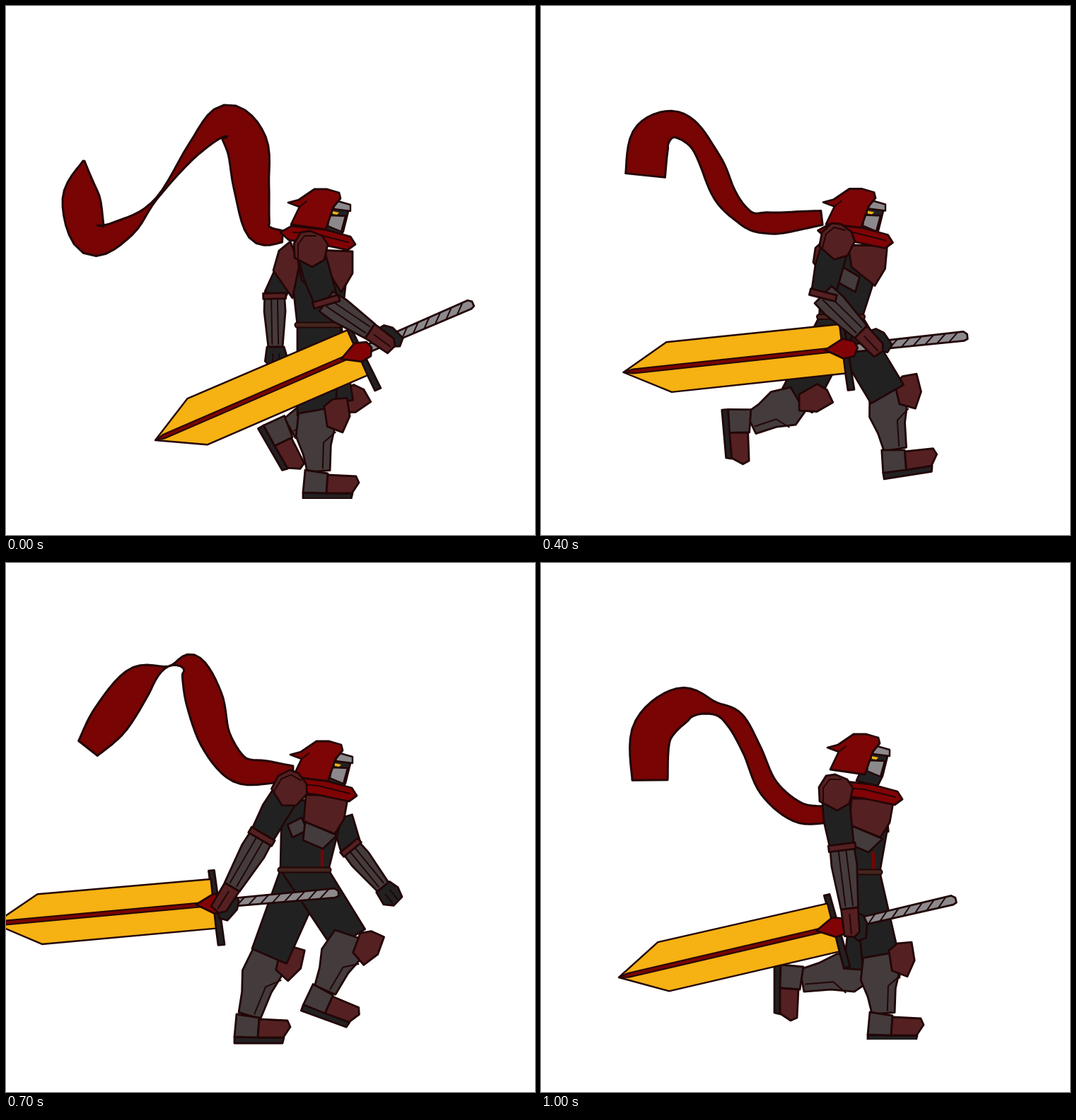
Write an HTML page with a canvas that moves like this. It is 748 px wide and 748 px high and loops after 1100 ms.

```html
<!DOCTYPE html>
<html lang="en">
<head>
<meta charset="utf-8">
<title>Knight walk</title>
<style>
html, body { margin: 0; width: 100%; height: 100%; overflow: hidden; background: #fff; }
canvas { display: block; width: 748px; height: 748px; }
</style>
</head>
<body>
<canvas id="stage" width="748" height="748"></canvas>
<script>
const ctx = document.getElementById('stage').getContext('2d');
const STEP = 100, COUNT = 11, SAMPLES = 60;
const INK = '#220607', CLOTH = '#780404', HOOD = '#7d0506', PLATE = '#552021',
  STEEL = '#443b3c', BLACK = '#222122', GREY = '#8c898d', GOLD = '#f6b112';

const rad = deg => deg * Math.PI / 180;
const clamp = (v, lo, hi) => Math.max(lo, Math.min(hi, v));
const shift = (p, x, y) => p.map((v, i) => v + (i % 2 ? y : x));

function mix(a, b, k) {
  if (typeof a === 'number') return a + (b - a) * k;
  if (Array.isArray(a)) return a.map((v, i) => mix(v, b[i], k));
  return Object.fromEntries(Object.keys(a).map(key => [key, mix(a[key], b[key], k)]));
}

// Smooth curve through the keys, evenly sampled
function sample(keys) {
  const last = keys.length - 1, key = i => keys[clamp(i, 0, last)];
  return Array.from({ length: SAMPLES + 1 }, (_, n) => {
    const u = n / SAMPLES * last, i = Math.min(Math.floor(u), last - 1), f = u - i;
    const a = key(i - 1), b = key(i), c = key(i + 1), d = key(i + 2);
    return b.map((v, j) => v + f / 2 * (c[j] - a[j]
      + f * (2 * a[j] - 5 * v + 4 * c[j] - d[j] + f * (3 * v - a[j] - 3 * c[j] + d[j]))));
  });
}

// Scarf centre lines from neck to tail: x, y, half width
const ess = sample([[391,326,8], [358,318,17], [347,255,25], [340,195,29], [310,163,23], [266,202,10],
  [213,272,1], [172,312,13], [122,330,23], [106,270,26], [110,219,1]]);
const arch = sample([[398,309,9], [362,309,16], [320,304,19], [288,262,22], [272,205,26], [253,157,16],
  [222,159,0], [180,180,22], [139,235,27], [108,275,17]]);
const dip = sample([[403,288,9], [369,298,13], [337,330,16], [296,362,10], [257,340,18], [241,275,21],
  [225,210,17], [197,174,13], [175,180,27], [163,216,31]]);
const hook = sample([[391,311,11], [343,309,14], [300,274,14], [276,220,13], [252,178,13], [222,161,9],
  [178,156,24], [135,195,28], [132,263,25]]);
const moved = (scarf, dx, dy) => scarf.map(([x, y, w]) => [x + dx, y + dy, w]);

// torso: offset, turn towards the viewer; waist: centre, half width
// legs: knee, ankle, boot angle; hand: far wrist; sword: tip, angle
const poses = {
  0: { head: [0,0], torso: [0,0,0], waist: [443,451,31], floor: 697, scarf: ess,
    legP: [436,580,442,656,0], legQ: [462,562,403,596,60], hand: [381,482], sword: [211,614,-23.4] },
  1: { head: [-1,0], torso: [6,3,0], waist: [442,452,28], floor: 686, scarf: arch,
    legP: [392,564,363,645,14], legQ: [498,533,475,606,22], hand: [352,475], sword: [221,600,-23.3] },
  3: { head: [1,0], torso: [-2,-3,0], waist: [418,438,30], floor: 700, scarf: dip,
    legP: [332,550,285,595,45], legQ: [513,543,543,614,-18], hand: [363,455], sword: [190,536,-13.3] },
  5: { head: [-1,-1], torso: [7,6,1], waist: [430,441,31], floor: 678, scarf: hook,
    legP: [384,572,312,584,125], legQ: [462,557,458,636,0], hand: [473,475], sword: [43,500,1.05] },
  7: { head: [3,-7], torso: [0,0,1], waist: [422,434,34], floor: 681, scarf: moved(arch, 8, -13),
    legP: [483,533,452,602,20], legQ: [370,555,345,638,0], hand: [533,458], sword: [-17,510,-5.2] },
  9: { head: [4,-14], torso: [5,-6,1], waist: [427,434,38], floor: 647, scarf: moved(dip, -8, -18),
    legP: [503,510,542,583,-15], legQ: [335,525,276,586,28], hand: [514,444], sword: [5,534,-10.8] },
  10: { head: [6,-17], torso: [15,5,1], waist: [461,437,18], floor: 674, scarf: moved(hook, 22, 44),
    legP: [478,562,484,635,0], legQ: [452,575,371,590,90], hand: [455,440], sword: [110,586,-13.1] }
};

// Each armour part seen from behind and from the front
const armour = [
  [PLATE, [402,333, 386,346, 378,374, 405,413, 415,365], [395,325, 385,335, 387,348, 392,352, 402,345]],
  [STEEL, [416,370, 425,378, 430,390, 420,385], [398,370, 418,360, 426,378, 405,388]],
  [STEEL, [413,362, 428,378, 436,402, 418,388], [423,366, 468,385, 448,404, 420,392]],
  [PLATE, [440,345, 490,347, 490,378, 474,405, 452,370], [424,328, 484,328, 478,362, 465,383, 421,365]]
];

function paint(fill, width) {
  ctx.fillStyle = fill;
  ctx.fill();
  ctx.lineWidth = width;
  ctx.strokeStyle = INK;
  ctx.stroke();
}

function trace(p) {
  ctx.beginPath();
  for (let i = 0; i < p.length; i += 2) ctx.lineTo(p[i], p[i + 1]);
}

function poly(fill, p, width = 2.8) {
  trace(p);
  ctx.closePath();
  paint(fill, width);
}

function line(p, width = 2, color = INK) {
  trace(p);
  ctx.lineWidth = width;
  ctx.strokeStyle = color;
  ctx.stroke();
}

function at(x, y, angle, draw) {
  ctx.save();
  ctx.translate(x, y);
  ctx.rotate(angle);
  draw();
  ctx.restore();
}

// Local x runs from the first joint to the second
function bone([x0, y0], [x1, y1], draw) {
  const dx = x1 - x0, dy = y1 - y0;
  at(x0, y0, Math.atan2(dy, dx), () => draw(Math.hypot(dx, dy)));
}

// Elbow of a two-bone arm, always bent backwards
function elbow([ax, ay], [bx, by], upper, lower) {
  const reach = clamp(Math.hypot(bx - ax, by - ay), Math.abs(upper - lower) + 1, upper + lower);
  const bend = Math.acos((upper ** 2 + reach ** 2 - lower ** 2) / (2 * upper * reach));
  const angle = Math.atan2(by - ay, bx - ax) + bend;
  return [ax + upper * Math.cos(angle), ay + upper * Math.sin(angle)];
}

function onSword([x, y, angle], along, side) {
  const c = Math.cos(rad(angle)), s = Math.sin(rad(angle));
  return [x + along * c - side * s, y + along * s + side * c];
}

function drawScarf(scarf) {
  const left = [], right = [];
  scarf.forEach(([x, y, w], i) => {
    const a = scarf[Math.max(i - 1, 0)], b = scarf[Math.min(i + 1, SAMPLES)];
    const dx = b[0] - a[0], dy = b[1] - a[1], k = w / Math.hypot(dx, dy);
    left.push([x + dy * k, y - dx * k]);
    right.unshift([x - dy * k, y + dx * k]);
  });
  poly(CLOTH, [...left, ...right].flat(), 3);
}

function drawBoot(x, y, angle) {
  at(x, y, rad(angle), () => {
    poly(BLACK, [-22,32, 48,33, 46,41, -22,41]);
    poly(STEEL, [-19,0, 13,5, 11,33, -22,32]);
    poly(PLATE, [13,7, 53,9, 57,18, 47,33, 11,33]);
  });
}

function drawLeg([kx, ky, ax, ay, angle]) {
  bone([kx, ky], [ax, ay], len => {
    const k = len / 80, lean = (kx - ax) / len;
    const fit = p => p.map((v, i) => i % 2 ? v : v * k);
    poly(STEEL, fit([-6,22, -10,-18, 14,-29, 45,-20, 82,-16, 82,16, 55,20, 28,28]));
    line(fit([26,-28, 40,-10, 78,-6]));
    // a folded knee pushes its cap over the end of the thigh
    const fold = clamp((lean - .35) / .6, 0, 1);
    poly(PLATE, shift([-13,-15, -22,-28, -22,-48, 4,-50, 26,-38, 16,-17], -30 * fold, 27 * fold));
  });
  drawBoot(ax, ay, angle);
}

function drawThigh([wx, wy, half], [kx, ky]) {
  const dx = kx - wx, dy = ky - wy, d = Math.hypot(dx, dy), nx = dy / d, ny = -dx / d;
  poly(BLACK, [wx - half, wy, wx + half, wy,
    kx + nx * 29, ky + ny * 29, kx - nx * 24, ky - ny * 24]);
}

function forearm(len, w) {
  poly(STEEL, [0,-w, len * .3,-w - 1, len,-w * .72, len,w * .72, len * .3,w + 1, 0,w]);
  for (const side of [-.3, .33]) line([5, w * side, len - 4, w * side]);
}

function drawFarArm(shoulder, wrist) {
  const mid = elbow(shoulder, wrist, 44, 72);
  bone(shoulder, mid, len => poly(BLACK, [0,-15, len,-15, len,15, 0,15]));
  bone(mid, wrist, len => {
    forearm(len, 14);
    poly(PLATE, [-4,-16, 4,-16, 4,16, -4,16]);
    ctx.translate(len, 0);
    poly(BLACK, [0,-12, 14,-16, 28,-12, 30,5, 20,15, 0,12]);
    for (const y of [-5, 4]) line([10, y, 26, y]);
  });
}

function drawNearArm(shoulder, wrist) {
  const mid = elbow(shoulder, wrist, 78, 75);
  bone(shoulder, mid, len => poly(BLACK, [0,-19, len,-17, len,17, len / 2,21, 0,19]));
  bone(mid, wrist, len => {
    forearm(len, 17);
    ctx.translate(len, 0);
    poly(BLACK, [6,-6, 12,-18, 24,-22, 44,-18, 47,-6, 36,2]);
    poly(PLATE, [0,-12, 34,-10, 41,-2, 38,12, 0,12]);
    line([8,1, 36,2]);
  });
  bone(shoulder, mid, len => poly(PLATE, [len - 4,-19, len + 5,-19, len + 5,19, len - 4,19]));
  const swing = Math.atan2(mid[1] - shoulder[1], mid[0] - shoulder[0]) - Math.PI / 2;
  at(...shoulder, Math.max(0, swing), () => {
    poly(PLATE, [-22,13, -23,-7, -13,-23, 0,-25, 17,-18, 25,-6, 20,16, 3,26]);
    line([-17,13, -17,-6, -8,-18, 8,-18]);
  });
}

function drawSword([x, y, angle], turn) {
  at(x, y, rad(angle), () => {
    const top = -35 - 12 * turn;
    poly(BLACK, [309,top, 317,top, 322,59, 313,59]);
    poly(GOLD, [0,0, 65,-36, 311,-35, 312,35, 65,35], 2.4);
    poly(CLOTH, [0,0, 14,-3, 300,-3, 300,3, 14,3], 2);
    poly(GREY, [326,-5, 484,-6, 489,-2, 489,5, 484,7, 326,6]);
    for (let i = 344; i < 475; i += 17) line([i, 6, i + 12, -5]);
    poly('#820306', [287,-1, 313,-14, 329,-9, 333,1, 327,12, 312,14]);
  });
}

function drawTorso([x, y, turn], [wx, wy, half], turned) {
  const l = wx - half, r = wx + half;
  const [lx, ly, rx, ry] = turned([400,345, 485,350], [390,338, 482,330]);
  poly(BLACK, [lx, ly, rx, ry, mix(rx, r, .6), mix(ry, wy, .6), r, wy, l, wy]);
  if (turn > .6) line([r - 9, wy - 27, r - 9, wy - 3], 4, CLOTH);
  line([l, wy, r, wy], 9);
  line([l, wy, r, wy], 5, '#44261f');
  for (const [fill, back, front] of armour) poly(fill, turned(back, front));
}

function drawHead(x, y) {
  at(x, y, 0, () => {
    poly(BLACK, [460,280, 484,290, 477,318, 470,332, 440,325]);
    poly(GREY, [466,275, 487,281, 487,290, 463,287], 2.4);
    poly(GREY, [457,296, 480,297, 474,319, 455,311], 2.4);
    trace([461,290, 471,292, 468,295, 462,294]);
    ctx.fillStyle = '#efb414';
    ctx.fill();
    poly(HOOD, [399,278, 414,274, 436,259, 454,259, 471,264, 473,272, 463,284, 452,316, 403,309, 415,284]);
    line([415,284, 425,276]);
  });
}

function drawCollar([x, y, turn]) {
  at(x + 2 * turn, y - 8 * turn, 0, () => {
    poly('#800305', [388,320, 404,311, 450,316, 487,326, 494,337, 483,345, 440,336, 400,331]);
    line([406,320, 440,323, 484,334]);
  });
}

function drawPose(p) {
  const [x, y, turn] = p.torso;
  const turned = (back, front) => shift(mix(back, front, turn), x, y);
  ctx.fillStyle = '#fff';
  ctx.fillRect(0, 0, 748, 748);
  ctx.save();
  ctx.beginPath();
  ctx.rect(0, 0, 748, p.floor);
  ctx.clip();
  drawScarf(p.scarf);
  drawFarArm(turned([398,370], [475,360]), p.hand);
  drawLeg(p.legQ);
  drawThigh(p.waist, p.legQ);
  drawThigh(p.waist, p.legP);
  drawLeg(p.legP);
  drawTorso(p.torso, p.waist, turned);
  drawHead(...p.head);
  drawCollar(p.torso);
  drawSword(p.sword, turn);
  drawNearArm(turned([430,343], [401,319]), onSword(p.sword, 340, -21));
  ctx.restore();
}

ctx.lineJoin = ctx.lineCap = 'round';
const cycle = Array.from({ length: COUNT }, (_, n) => poses[n] || mix(poses[n - 1], poses[n + 1], .5));

function tick() {
  drawPose(cycle[Math.floor(performance.now() / STEP) % COUNT]);
  requestAnimationFrame(tick);
}
tick();
</script>
</body>
</html>
```
